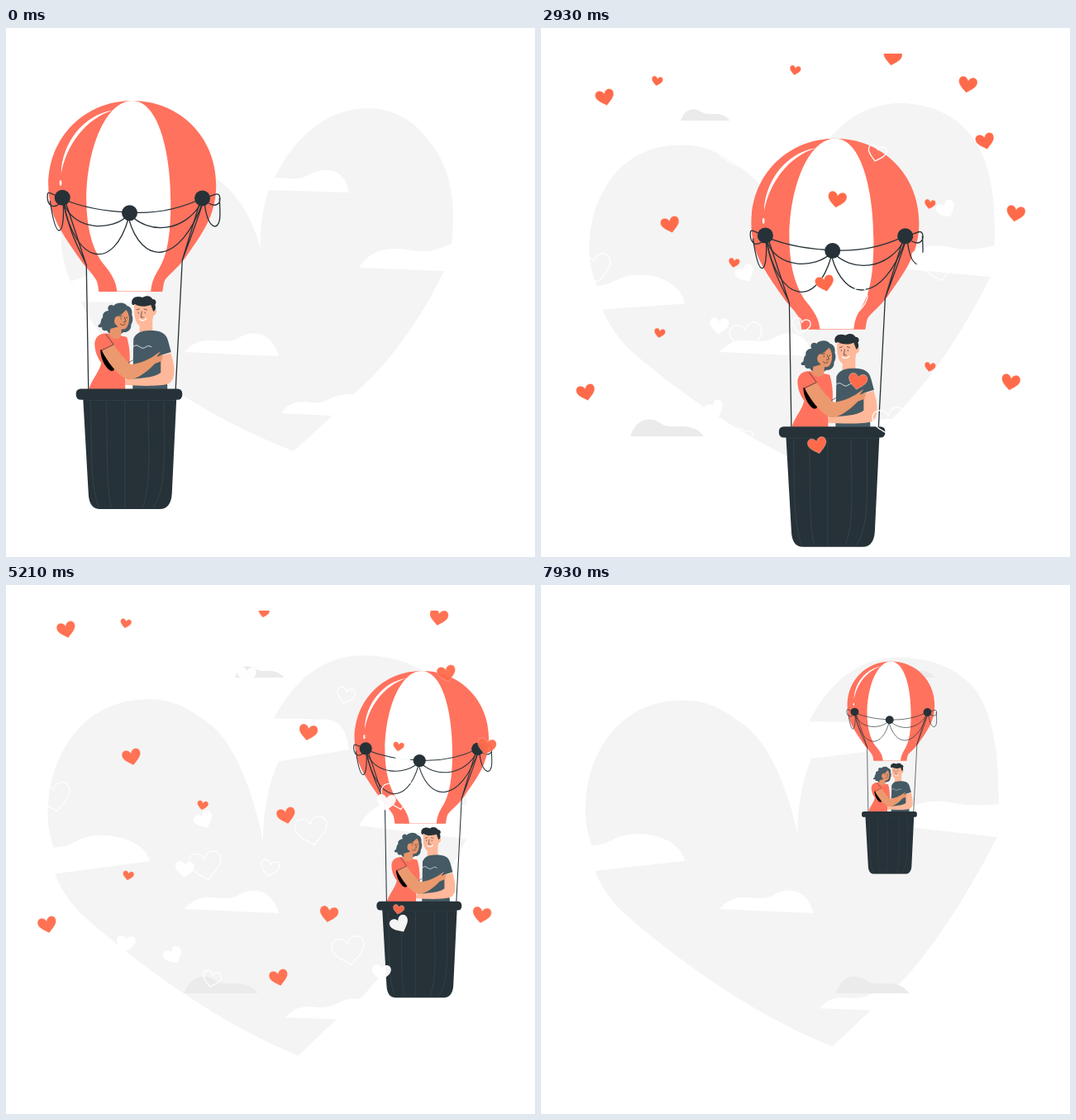
Animation, 640 px wide and 640 px high, one loop 8000 ms. Source, as an HTML page:

```html
<!DOCTYPE html>
<html lang="en">
<head>
<meta charset="utf-8">
<title>Balloon ride</title>
<style>
html, body { margin: 0; width: 100%; height: 100%; overflow: hidden; background: #fff; }
svg { display: block; width: 100vw; height: 100vh; }
.rope { fill: none; stroke: #263238; stroke-width: 1.3; }
.seam { fill: none; stroke: #37474f; stroke-width: .8; }
.face { fill: none; stroke: #263238; stroke-width: .7; stroke-linecap: round; }
.full { fill: #ff6b4a; stroke: #fff; stroke-opacity: .4; stroke-width: .7; }
.white { fill: #fff; }
.line { fill: none; stroke: #fff; stroke-width: 1.3; }
#hearts path { vector-effect: non-scaling-stroke; }
</style>
</head>
<body>
<svg viewBox="0 0 640 640">
  <defs>
    <clipPath id="sky"><rect y="31" width="640" height="609"/></clipPath>
    <path id="cloud" d="M0 14C4 0 16 -3 25 4C33 8 41 5 47 6.500C54 8 57 11 59 14Z" fill="#ebebeb"/>
  </defs>
  <g id="backdrop"></g>
  <path fill="#fff" d="M216 392C225 382 235 377 250 378C262 379 270 380 280 376C295 366 320 364 330 397Z"/>
  <g id="clouds">
    <use href="#cloud" y="98"/>
    <use href="#cloud" transform="translate(-61 473) scale(1.5)"/>
  </g>

  <g id="balloon">
    <path fill="#ff725e" d="M152.500 88C210 88 254 132 254 190C254 228 236 250 216 279C206 292 196 299 192 305C190 309 190 314 189 319H112C111 312 111 307 107 302C102 294 96 290 88 278C69 250 51 228 51 190C51 132 95 88 152.500 88Z"/>
    <path fill="#fff" d="M152.500 88C122 88 98 142 97 206C97 250 108 273 118 286C128 298 133 307 134 318.600H175C176 307 179 301 185 291C196 273 199 245 199 211C199 150 184 88 152.500 88Z"/>
    <path fill="#fff" d="M129 99.500C93 105 67 140 66.500 176C73 141 96 110 129 99.500Z"/>
    <ellipse cx="65.800" cy="187.500" rx="1.300" ry="3.500" fill="#fff"/>
    <g class="rope">
      <path d="M68 207C95 218 120 222 149 223C180 225 210 219 237 206"/>
      <path d="M70 212C80 244 128 248 149 225C172 250 216 248 237 210"/>
      <path d="M69 210C84 288 130 294 148 230C164 288 210 288 238 210"/>
      <path d="M68 205C58 204 50 195 50 202C49 214 56 219 64 213M53 209C56 229 60 245 64 245C68 245 70 232 69 212"/>
      <path d="M237 206C248 205 256 197 258 203C261 213 253 217 245 212M240 212C242 232 248 240 253 240C260 238 259 225 258 206"/>
      <path d="M69 211C76 248 91 272 97 287L99.500 437M72 211L97 287"/>
      <path d="M238 211C229 240 219 264 213 281L205 437M234 212L213 281"/>
    </g>
    <g fill="#263238">
      <circle cx="68" cy="205.300" r="9.500"/><circle cx="149.300" cy="223.700" r="9.500"/><circle cx="237.300" cy="206" r="9.500"/>
    </g>

    <g id="couple">
      <path fill="#ffb899" d="M162 352H177V370L170 376L161 369Z"/>
      <path fill="#ffb899" d="M155 334C162 330 173 331 178 338C183 338 183 347 178 348C177 357 172 361 166 361.500C157 361 154 351 155 334Z"/>
      <path fill="#263238" d="M152 333C151 327 157 323 165 326C170 323 175 324 177 328C182 328 182 333 180 335C182 339 180 342 178 343L175 335C168 338 159 337 156 334C154 336 152 335 152 333Z"/>
      <path fill="#455a64" d="M154 376C158 367 165 366 178 366C190 367 194 371 196 379L199.500 392L187 396L190 422L195 432V437H153Z"/>
      <path fill="#ffb899" d="M187 397L199 393C204 408 206 424 197 430C187 434 161 433 144 432V426C160 423 178 424 187 417Z"/>
      <path d="M153 386C160 380 161 389 167 387C172 384 172 384 176 386" fill="none" stroke="#fff" stroke-width=".8"/>
      <path fill="#ff725e" d="M107 381C109 369 119 369 125 370C132 374 139 371 146 374C150 388 150 400 149 410L144 423V437H100C104 424 113 416 115 405C109 397 107 389 107 381Z"/>
      <path fill="#455a64" d="M124 342C121 337 126 333 130 336C135 331 144 332 146 336C151 337 153 342 152 347C154 351 153 356 151 359C152 364 147 369 142 368C139 371 134 370 131 368C128 371 123 370 122 366C118 367 115 365 116 362C112 363 110 361 112 359C116 358 113 353 117 350C116 345 120 342 124 342Z"/>
      <path fill="#e8946a" d="M126 364L140 360L139 372C136 379 126 376 125 371Z"/>
      <path fill="#e8946a" d="M133 349C138 349 142 344 145 341C149 345 150 354 147 360C145 366 138 366 134 360C130 358 130 352 133 349Z"/>
      <path fill="#000" d="M114 389L117 391L131 412C130 416 126 416 122 411C117 405 114 397 114 389Z"/>
      <path fill="#eb996e" d="M116 391L130 383C137 394 145 402 151 407C163 406 171 401 177 398L187 391L182 398L190 395L188 403L180 406C169 418 153 428 145 425C133 418 123 404 116 391Z"/>
      <path class="face" d="M115 390L130 383L121 371M148 405L153 402M137 349L140 348M139 351V352M146 350V351M143 350L145 355L142 356M138 358C140 360 142 360 144 358M158 341L161 340M167 340L170 341M164 343L163 350L166 350M160 344V345M168 344V345"/>
      <path d="M161 352C164 355 168 354 170 351" stroke="#fff" stroke-width="1.300" fill="none"/>
    </g>

    <path fill="#263238" d="M93 448H206L200.500 563C200 575 195 582 186 582H114C104 582 100 575 99.500 563Z"/>
    <path class="seam" d="M102 452C104 490 100 550 112 580M121 452C123 490 120 550 127 580M143.500 451V581M172 452C171 490 177 550 165 580M191 452C190 500 196 555 178 580M96 450.300H205"/>
    <rect x="84.500" y="436.500" width="128.500" height="13.300" rx="5.500" fill="#263238"/>
  </g>
  <g clip-path="url(#sky)"><g id="hearts"></g></g>
</svg>
<script>
const LOOP = 8000, PULSE = 2000;
const $ = id => document.getElementById(id);
const clamp = v => Math.min(1, Math.max(0, v));

function add(parent, attrs, tag = 'path') {
  const el = document.createElementNS('http://www.w3.org/2000/svg', tag);
  for (const key in attrs) el.setAttribute(key, attrs[key]);
  return parent.appendChild(el);
}

// cubic-bezier(x1, 0, x2, 1), solved by bisection.
function bezier(x1, x2) {
  return p => {
    p = clamp(p);
    let lo = 0, hi = 1, s;
    for (let i = 0; i < 24; i++) {
      s = (lo + hi) / 2;
      const x = 3 * x1 * s * (1 - s) ** 2 + 3 * x2 * s * s * (1 - s) + s ** 3;
      if (x < p) lo = s; else hi = s;
    }
    return s * s * (3 - 2 * s);
  };
}
const easeInOut = bezier(.42, .58);
const easeRise = bezier(.5, .3);
const leg = (t, from, length) => easeInOut((t - from) / length);

const NUMBER = /\d+/g;
function morph(from, to, m) {
  const ends = to.match(NUMBER);
  let i = 0;
  return from.replace(NUMBER, a => (+a + (ends[i++] - a) * m).toFixed(2));
}

// The big heart and the clouds cut into its rim, each in a small and a large pose.
const backdrop = [
  ['#f4f4f4',
    'M348 512L395 469L421 443C460 408 497 362 530 294L539 261C545 205 537 165 508 132C488 106 460 97 438 97C390 97 350 130 325 181L318 196C311 215 307 240 308 267C300 235 283 205 262 188C252 179 240 172 230 166C205 148 185 145 165 145C100 145 67 200 67 255C67 275 71 290 78 306L91 331C97 347 110 366 125 380C190 435 270 482 348 512Z',
    'M354 571L400 527L428 503C470 460 515 390 558 308L558 266C556 205 551 155 530 125C508 98 470 85 432 85C385 85 350 112 324 161L330 214C318 240 311 275 311 311C303 270 288 222 268 192C259 178 248 168 237 161C212 143 195 138 172 138C90 138 50 210 50 278C50 292 53 305 57 318L58 350C65 368 78 388 95 403C180 478 275 540 354 571Z'],
  ['#fff',
    'M325 181L345 182C365 184 368 172 388 172C405 172 412 185 415 199L318 196Z',
    'M324 161L350 161C365 161 375 163 385 162C408 164 412 180 415 199L330 214Z'],
  ['#fff',
    'M78 306C95 304 98 295 122 294C150 293 170 310 174 333L91 331Z',
    'M57 318C85 317 85 303 115 303C150 304 170 318 174 334L58 350Z'],
  ['#fff',
    'M427 290C438 272 455 267 470 267C487 267 487 270 505 270C520 270 525 266 539 261L530 294Z',
    'M427 291C438 272 455 262 470 261C490 257 505 264 522 265C535 266 545 266 558 266L558 308Z'],
  ['#fff',
    'M333 466C340 455 350 452 362 452C378 455 385 452 395 447C405 443 412 443 421 443L395 469Z',
    'M338 525C350 511 362 511 378 513C395 513 400 508 408 505C415 502 421 502 428 503L400 527Z']
].map(([fill, small, large]) => ({ el: add($('backdrop'), { fill }), small, large }));

// Heart families share look, size, tilt and drift per unit of rise.
const HEART = 'M0 .9C-.4 .55 -1 .2 -1 -.3C-1 -.9 -.25 -1 0 -.4C.25 -1 1 -.9 1 -.3C1 .2 .4 .55 0 .9Z';
const families = [
  { look: 'line', size: 19.5, tilt: -10, drift: [.23, 1.15],
    at: [[243, 346], [371, 304], [476, 261], [416, 449], [60, 263], [228, 122], [406, 38], [54, 168]] },
  { look: 'line', size: 11, tilt: 14, drift: [-.15, .6],
    at: [[410, 137], [318, 346], [222, 126], [248, 480]] },
  { look: 'white', size: 11.5, tilt: 4, drift: [-.02, .55],
    at: [[216, 347], [145, 437], [460, 266], [454, 472], [291, 112], [126, 125]] },
  { look: 'white', size: 11.5, tilt: -27, drift: [.26, .43],
    at: [[241, 287], [204, 451], [484, 209], [478, 413]] },
  { look: 'full', size: 11.3, tilt: -13, drift: [.145, 1],
    at: [[74, 60], [534, 113], [153, 214], [340, 285], [51, 417], [331, 481]] },
  { look: 'full', size: 11.3, tilt: 10, drift: [-.245, .98],
    at: [[522, 45], [431, 12], [364, 184], [580, 201], [389, 404], [574, 405]] },
  { look: 'full', size: 6.7, tilt: 10, drift: [-.147, .59],
    at: [[144, 50], [311, 37], [474, 199], [237, 270], [147, 355], [474, 396]] }
];
for (const f of families) {
  f.el = add($('hearts'), { class: f.look }, 'g');
  for (const [x, y] of f.at)
    add(f.el, { d: HEART, transform: `translate(${x} ${y}) rotate(${f.tilt}) scale(${f.size})` });
}

function drawBackdrop(t) {
  const phase = (t + 130) / 6100;
  const swell = easeInOut(phase < 1 ? phase : 2 - phase);
  for (const b of backdrop) b.el.setAttribute('d', morph(b.small, b.large, swell));
  $('clouds').setAttribute('transform', `translate(${90.5 + 439 * leg(t, -1180, 14000)} 0)`);
  $('clouds').setAttribute('opacity', clamp(t / 900));
}

// Out to the right, a short rest, then back and away.
function drawBalloon(t) {
  const back = leg(t, 6095, 5570);
  const x = 148.75 + 352.5 * (leg(t, -105, 5570) - back);
  const y = 334.2 + 47.8 * leg(t, -270, 2940) - 83.5 * leg(t, 2670, 2940) - 342 * back;
  const scale = 1 - .362 * leg(t, 4212, 1883) - .52 * back;
  $('balloon').setAttribute('transform', `translate(${x} ${y}) scale(${scale}) translate(-148.75 -335)`);
}

function drawHearts(p) {
  const lift = 100 - 128 * easeRise(p / PULSE);
  $('hearts').setAttribute('opacity', clamp(Math.min((p - 75) / 645, (1780 - p) / 600)));
  for (const { el, drift } of families)
    el.setAttribute('transform', `translate(${drift[0] * lift} ${drift[1] * lift})`);
}

function draw(t) {
  drawBackdrop(t);
  drawBalloon(t);
  drawHearts(t % PULSE);
}

let start;
function tick(now) {
  start ??= now;
  draw((now - start) % LOOP);
  requestAnimationFrame(tick);
}
draw(0);
requestAnimationFrame(tick);
</script>
</body>
</html>
```
